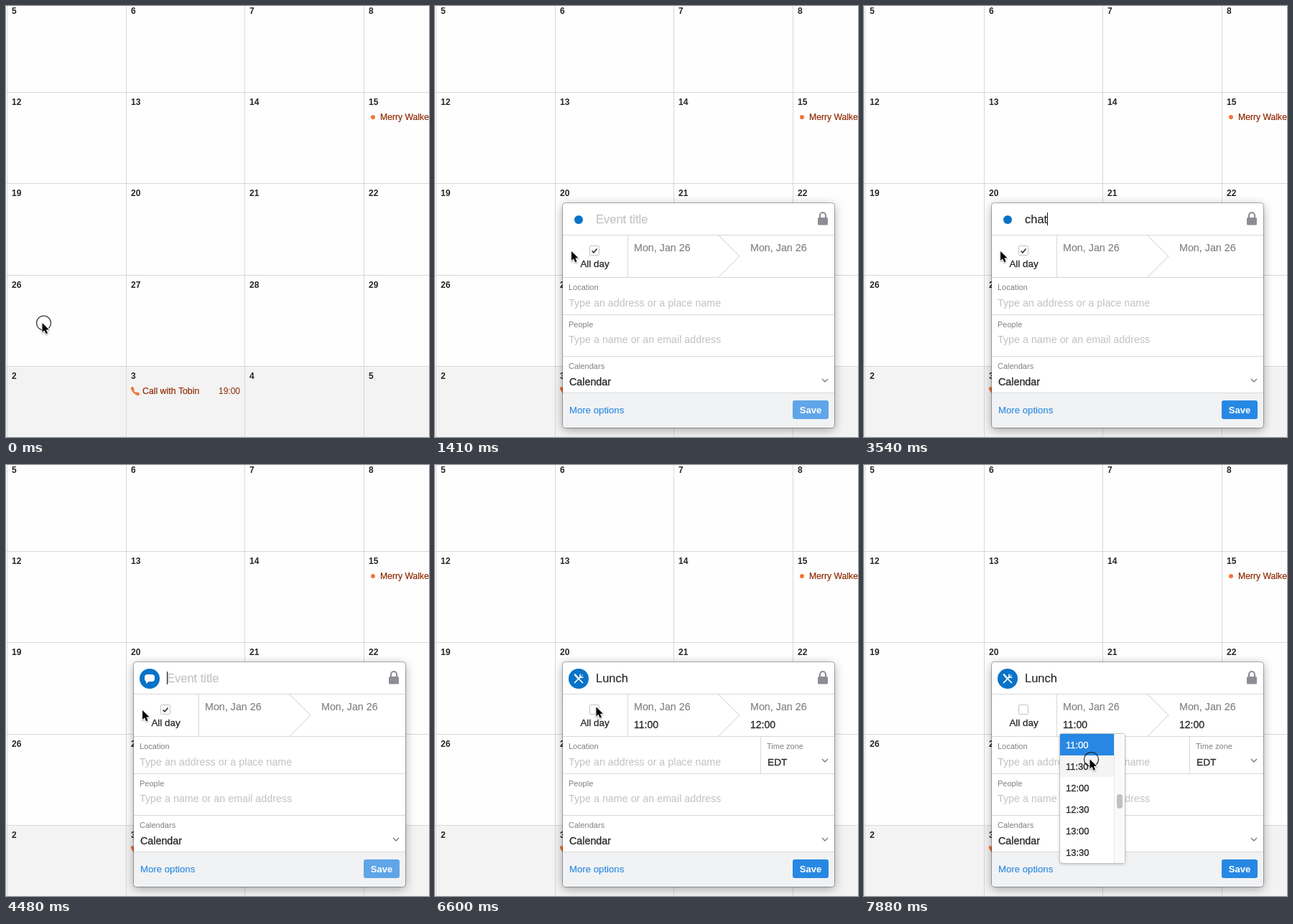
Animation of 589 by 601 pixels, one loop 8 s. Source, as an HTML page with a canvas:

```html
<!DOCTYPE html>
<html lang="en">
<head>
<meta charset="utf-8">
<title>Calendar event</title>
<style>
html, body { margin: 0; width: 100%; height: 100%; overflow: hidden; background: #fefefe; }
canvas { display: block; width: 589px; height: 601px; }
</style>
</head>
<body>
<canvas id="stage"></canvas>
<script>
const W = 589, H = 601, LOOP = 8000;
const canvas = document.getElementById('stage');
const c = canvas.getContext('2d');
const ratio = window.devicePixelRatio || 1;
canvas.width = W * ratio;
canvas.height = H * ratio;

const BLUE = '#0873c7', ACTION = '#2788e3', LINE = '#d8d8d8', DARK = '#272727', GREY = '#808080';
const HINT = '#c2c2c6', RUST = '#8f2a04', ORANGE = '#f5743a';

// Each track holds [start time, value] pairs; a value lasts until the next one.
const CURSOR = [
  [0, [50.5, 442]], [120, [51, 442.5]], [940, [55, 442]], [1050, [62, 441]], [1290, [130, 391]],
  [1410, [190, 342]], [5900, [208, 339]], [6020, [245, 336]], [6130, [278, 337]],
  [6250, [256, 338]], [6370, [234, 338]], [6480, [224.5, 337.5]], [6720, [234, 342]],
  [6840, [262, 353]], [6950, [292, 360]], [7060, [298, 361]], [7410, [303, 367]],
  [7530, [309, 383]], [7650, [313, 400]], [7760, [314.5, 410.5]]
];
const TITLE = [
  [0, ''], [2720, 'c'], [2830, 'ch'], [3300, 'cha'], [3420, 'chat'], [4020, 'cha'], [4140, 'ch'],
  [4250, 'c'], [4370, ''], [5070, 'L'], [5190, 'Lu'], [5300, 'Lun'], [5540, 'Lunch']
];
const CARET = [[0, false], [1050, true], [1410, false], [1770, true], [2250, false], [2720, true], [6480, false]];
const SAVE = [[0, 0.72], [2830, 0.86], [3190, 1], [4370, 0.86], [4480, 0.72], [5070, 0.86], [5190, 1]];
const ICON = [[0, 'idle'], [820, 'dot'], [3780, 'chat'], [4720, 'dot'], [5780, 'meal']];
const RING = [[0, true], [120, false], [6480, true], [6600, false], [7060, true], [7180, false], [7880, true]];
const POPUP = [[0, 0], [360, 0.4], [470, 0.8], [590, 1]];
const DROP = [[0, 119], [820, 62], [940, 12], [1050, 0]];
const MENU = [[0, 0], [7180, 0.4], [7290, 0.85], [7410, 1]];

function at(track, t) {
  let value = track[0][1];
  for (const [start, next] of track) if (t >= start) value = next;
  return value;
}

function text(str, x, y, size, color, { weight = 400, medium = 0, align = 'left' } = {}) {
  c.font = `${weight} ${size}px "Liberation Sans", Arial, sans-serif`;
  c.textAlign = align;
  c.fillStyle = color;
  c.fillText(str, x, y);
  if (medium) {
    c.strokeStyle = color;
    c.lineWidth = medium;
    c.strokeText(str, x, y);
  }
}

function rect(x, y, w, h, color) {
  c.fillStyle = color;
  c.fillRect(x, y, w, h);
}

function round(x, y, w, h, r) {
  c.beginPath();
  c.roundRect(x, y, w, h, r);
}

function circle(x, y, r, color) {
  c.beginPath();
  c.arc(x, y, r, 0, Math.PI * 2);
  c.fillStyle = color;
  c.fill();
}

function path(points, color, width) {
  c.beginPath();
  points.forEach(([x, y]) => c.lineTo(x, y));
  c.strokeStyle = color;
  c.lineWidth = width;
  c.stroke();
}

function shadow(blur, offset, alpha) {
  c.shadowColor = `rgba(0,0,0,${alpha})`;
  c.shadowBlur = blur * ratio;
  c.shadowOffsetY = offset * ratio;
}

function drawGrid() {
  const columns = [1, 167, 332, 498], rows = [-7, 120, 247, 375, 502];
  rect(0, 0, W, H, '#fefefe');
  rect(0, 503, W, 98, '#f3f3f3');
  rows.forEach((y, r) => {
    rect(0, y, W, 1, LINE);
    columns.forEach((x, i) => {
      const day = r < 4 ? 5 + r * 7 + i : 2 + i;
      text(day, x + 7, y + 18, 12, '#262626', { weight: 700 });
    });
  });
  columns.forEach(x => rect(x, 0, 1, H, LINE));

  circle(511, 155, 3, ORANGE);
  text('Merry Walkers', 521, 159, 12.2, RUST, { medium: 0.2 });
  c.lineCap = 'round';
  c.beginPath();
  c.moveTo(176, 534);
  c.quadraticCurveTo(177, 540, 183.5, 541);
  c.strokeStyle = ORANGE;
  c.lineWidth = 2.4;
  c.stroke();
  path([[175.8, 533], [176.6, 535]], ORANGE, 4);
  path([[182, 540.5], [184, 541.2]], ORANGE, 4);
  c.lineCap = 'butt';
  text('Call with Tobin', 190, 541, 12.3, RUST, { medium: 0.2 });
  text('19:00', 326, 541, 12, RUST, { align: 'right' });
}

function drawIcon(kind) {
  if (kind === 'idle') return circle(200, 298, 6, '#f1f1f1');
  if (kind === 'dot') return circle(200, 298, 6, BLUE);
  circle(200, 298, 14, BLUE);
  if (kind === 'chat') {
    c.fillStyle = '#fff';
    round(193, 292, 14, 10, 4);
    c.fill();
    c.beginPath();
    c.moveTo(195, 300);
    c.lineTo(195, 305);
    c.lineTo(200, 301);
    c.fill();
    return;
  }
  c.lineCap = 'round';
  path([[194.5, 303.5], [203, 295]], '#fff', 1.7);
  path([[202, 292], [201.5, 296.5], [206, 296]], '#fff', 1.4);
  path([[203, 295], [205.5, 292.5]], '#fff', 1);
  path([[195, 292.5], [199, 297]], '#fff', 2.6);
  path([[199, 297], [205.5, 303.5]], '#fff', 1.7);
  c.lineCap = 'butt';
}

function drawLock() {
  c.fillStyle = '#8d8d95';
  round(533, 295, 14, 10.5, 1.5);
  c.fill();
  c.beginPath();
  c.moveTo(536, 296);
  c.lineTo(536, 292);
  c.arc(540, 292, 4, Math.PI, 0);
  c.lineTo(544, 296);
  c.strokeStyle = '#8d8d95';
  c.lineWidth = 2.2;
  c.stroke();
}

function arrowDown(x, y) {
  path([[x - 4, y - 2], [x, y + 2], [x + 4, y - 2]], '#777', 1.3);
}

function drawPopup(t) {
  const size = at(POPUP, t);
  if (!size) return;
  const loaded = t >= 820, timed = t >= 6600, title = at(TITLE, t);
  c.save();
  c.translate(0, at(DROP, t));
  c.globalAlpha = size;
  const scale = 0.9 + size * 0.1;
  c.translate(178, 340);
  c.scale(scale, scale);
  c.translate(-178, -340);

  c.save();
  shadow(14, 3, 0.34);
  c.fillStyle = '#fff';
  round(178, 275, 378, 313, 4);
  c.fill();
  c.restore();
  c.save();
  round(178, 275, 378, 313, 4);
  c.clip();
  rect(178, 540, 378, 48, '#f1f2f4');
  [319, 378, 430, 488, 539].forEach(y => rect(178, y, 378, 1, LINE));
  rect(268, 320, 1, 58, LINE);
  path([[395, 320], [424, 349], [395, 378]], '#d0d0d0', 1);
  c.restore();
  round(177.5, 274.5, 379, 314, 4);
  c.strokeStyle = 'rgba(0,0,0,.28)';
  c.lineWidth = 1;
  c.stroke();

  drawIcon(at(ICON, t));
  if (loaded) drawLock();
  if (title) text(title, 224, 303, 16.5, DARK, { medium: 0.15 });
  else text('Event title', 224, 303, 16.5, '#c6c6c9', { medium: 0.3 });
  if (at(CARET, t)) {
    c.font = '400 16.5px "Liberation Sans", Arial, sans-serif';
    const end = title ? 224 + c.measureText(title).width : 223.5;
    rect(Math.round(end), 288, 1, 18, '#111');
  }

  round(215.5, 334.5, 13, 13, 1);
  c.fillStyle = '#fff';
  c.fill();
  c.strokeStyle = '#c3c3c3';
  c.lineWidth = 1;
  c.stroke();
  if (loaded && !timed) path([[218.5, 341.5], [221, 344], [225.5, 338.5]], '#333', 1.7);
  text('All day', 222.5, 364, 13.4, DARK, { medium: 0.3, align: 'center' });
  [277, 439].forEach((x, i) => {
    text('Mon, Jan 26', x, 342, 14.3, GREY, { medium: 0.15 });
    if (timed) text(['11:00', '12:00'][i], x, 367, 14, DARK, { medium: 0.3 });
    else if (!loaded) text('00:00', x, 367, 14, GREY, { medium: 0.2 });
  });

  text('Location', 186, 396, 11, GREY);
  text('Type an address or a place name', 186, 419, 14.3, HINT);
  text('People', 186, 448, 11, GREY);
  text('Type a name or an email address', 186, 470, 14.3, HINT);
  text('Calendars', 186, 506, 11, GREY);
  text('Calendar', 187, 529, 14.3, DARK, { medium: 0.3 });
  arrowDown(543, 522);
  if (timed) {
    rect(453, 379, 1, 51, LINE);
    text('Time zone', 462, 396, 11, GREY);
    text('EDT', 463, 419, 13.7, DARK, { medium: 0.3 });
    arrowDown(543, 412);
  }

  text('More options', 187, 568, 13.2, ACTION, { medium: 0.1 });
  c.globalAlpha = size * at(SAVE, t);
  round(498, 550, 50, 26, 3);
  c.fillStyle = ACTION;
  c.fill();
  c.globalAlpha = size;
  text('Save', 523, 568, 13, '#fff', { weight: 700, align: 'center' });
  c.restore();
}

function drawMenu(t, cursorY) {
  const alpha = at(MENU, t);
  if (!alpha) return;
  c.save();
  c.globalAlpha = alpha;
  c.save();
  shadow(4, 1, 0.3);
  round(273, 375, 90, 180, 3);
  c.fillStyle = '#fff';
  c.fill();
  c.restore();
  round(272.5, 374.5, 91, 181, 3);
  c.strokeStyle = '#c4c4c4';
  c.lineWidth = 1;
  c.stroke();
  rect(349, 375, 14, 180, '#fafafa');
  rect(348, 375, 1, 180, '#e6e6e6');
  const hover = Math.floor((cursorY - 375) / 30);
  for (let i = 0; i < 6; i++) {
    const y = 375 + i * 30;
    if (i === 0) rect(273, y, 75, 30, ACTION);
    else if (i === hover) rect(273, y, 75, 30, '#f4f4f4');
    const label = `${11 + (i >> 1)}:${i % 2 ? '30' : '00'}`;
    text(label, 281, y + 20, 13, i ? DARK : '#fff', { medium: 0.3 });
  }
  round(352, 459, 8, 20, 4);
  c.fillStyle = '#c1c1c1';
  c.fill();
  c.restore();
}

function drawCursor(t, [x, y]) {
  if (at(RING, t)) {
    c.beginPath();
    c.arc(x + 2, y, 10, 0, Math.PI * 2);
    c.strokeStyle = '#111';
    c.lineWidth = 1.1;
    c.stroke();
  }
  c.save();
  c.translate(x, y);
  c.beginPath();
  [[0, 0], [0, 13], [3, 10.3], [5.2, 15.2], [7.5, 14.2], [5.4, 9.6], [9.4, 9.3]]
    .forEach(([px, py]) => c.lineTo(px, py));
  c.closePath();
  shadow(2, 1, 0.35);
  c.strokeStyle = '#fff';
  c.lineWidth = 2;
  c.stroke();
  c.shadowColor = 'transparent';
  c.fillStyle = '#000';
  c.fill();
  c.restore();
}

function draw(now) {
  const t = now % LOOP;
  const cursor = at(CURSOR, t);
  c.setTransform(ratio, 0, 0, ratio, 0, 0);
  c.lineJoin = 'round';
  drawGrid();
  drawPopup(t);
  drawMenu(t, cursor[1]);
  drawCursor(t, cursor);
}

const begin = performance.now();
function frame() {
  draw(performance.now() - begin);
  requestAnimationFrame(frame);
}
frame();
</script>
</body>
</html>
```
